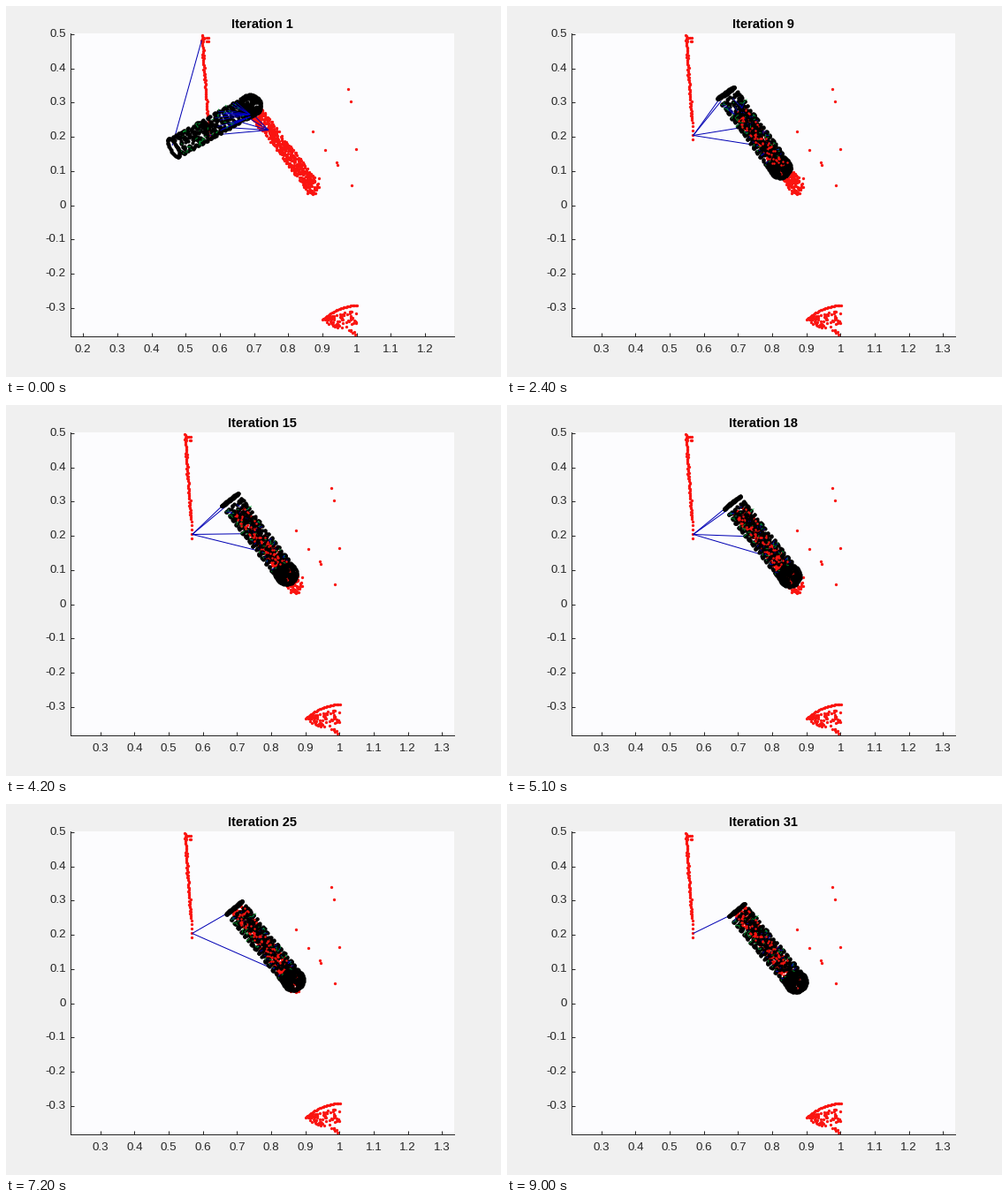
These frames come from a looping animation (560 by 420 pixels, 9.3 s). A matplotlib script:

```python
import numpy as np
import matplotlib.pyplot as plt
from matplotlib.animation import FuncAnimation
from matplotlib.collections import LineCollection

W, H, DPI = 560, 420, 100
PX = 72 / DPI
STEPS = 31
R = 11.6
SCALE = 387.5
RED = "#fa1410"
INK = "#262626"
ROOT = (211, 146)
rng = np.random.default_rng(4)

plt.rcParams["font.family"] = "Liberation Sans"

# Key poses of the model cylinder: step, centre x, centre y, angle
KEYS = np.array([
    [0, 214, 136, -29],
    [4, 262, 127.5, 24.5],
    [8, 278.5, 140, 54],
    [17, 287.5, 151.5, 52],
    [30, 293.5, 160, 50.5],
])


def pchip(t, x, y):
    """Monotone cubic interpolation."""
    h, d = np.diff(x), np.diff(y) / np.diff(x)
    m = np.r_[d[0], np.zeros(len(x) - 2), 0]
    for i in range(1, len(d)):
        if d[i - 1] * d[i] > 0:
            m[i] = 2 / (1 / d[i - 1] + 1 / d[i])
    i = min(np.searchsorted(x, t, side="right") - 1, len(h) - 1)
    s = (t - x[i]) / h[i]
    return (y[i] + h[i] * m[i] * s * (1 - s) ** 2
            + (y[i + 1] - y[i]) * s * s * (3 - 2 * s)
            + h[i] * m[i + 1] * s * s * (s - 1))


def disc(n, x, y, r):
    a, d = rng.uniform(0, 2 * np.pi, n), r * np.sqrt(rng.random(n))
    return np.c_[x + d * np.cos(a), y + d * np.sin(a)]


def pole_points():
    y = np.r_[np.linspace(32, 128, 62), np.linspace(131, 150, 5)]
    x = 203 + 8 * ((y - 32) / 118) ** 1.15 + rng.normal(0, .5, y.size)
    return np.c_[x, y]


def tube_points():
    s, n = rng.uniform(0, 106, (520, 1)), rng.uniform(-8, 8, (520, 1))
    strip = np.array([262, 118]) + s * (.61, .79) + n * (.79, -.61)
    return np.r_[strip, disc(50, 327, 204, 9)]


def fan_points():
    def rim(x):
        return 338.5 + 16 * ((378 - x) / 39) ** 2

    x = np.linspace(339, 378, 30)
    arc = np.c_[x, rim(x)]
    x = rng.uniform(342, 378, 85)
    low = 357 + .42 * (x - 340)
    return np.r_[arc, np.c_[x, rim(x) + (low - rim(x)) * rng.uniform(.2, 1, x.size)]]


def model_points():
    """Cylinder surface: along axis (0..1), end tilt, across, extra along in px."""
    rim = np.linspace(0, 2 * np.pi, 44)
    s = np.repeat(np.linspace(.08, .95, 16), 29)
    phi = rng.uniform(0, 2 * np.pi, s.size)
    s = s + rng.normal(0, .007, s.size)
    cap = disc(130, 0, 0, R + .6)
    edge = np.c_[np.cos(rim), np.sin(rim)] * (R + .6)
    cap = np.r_[cap, edge]
    along = np.r_[0 * rim, s, np.ones(len(cap))]
    tilt = np.r_[np.cos(rim), np.cos(phi), np.zeros(len(cap))]
    across = np.r_[R * np.sin(rim), R * np.sin(phi), cap[:, 1]]
    extra = np.r_[np.zeros(rim.size + s.size), cap[:, 0]]
    return along, tilt, across, extra


pole, tube, fan = pole_points(), tube_points(), fan_points()
tip = disc(8, 208, 39, 5)
stray = [(368, 93), (371, 107), (328, 141), (342, 162), (377, 161),
         (355.5, 176), (356, 179), (372, 202), (335, 194)]
along, tilt, across, extra = model_points()
front = tube[(rng.random(len(tube)) < .13) & (tube[:, 1] < 180)]
body = np.arange(44, 480)
pairs = rng.choice(body, 45, replace=False)
flecks = rng.choice(body, 45, replace=False)
fleck_dir = rng.normal(0, 2, (45, 2))


def pose(k):
    cx, cy, ang = (pchip(k, KEYS[:, 0], KEYS[:, j]) for j in (1, 2, 3))
    early = np.exp(-(k / 6) ** 2)
    size, lean = 105 - 6 * early, 1 + 3 * early
    a = np.radians(ang)
    u = np.array([np.cos(a), np.sin(a)])
    return np.array([cx, cy]) - u * size / 2, u, np.array([u[1], -u[0]]), size, lean


def place(k):
    start, u, n, size, lean = pose(k)
    return (start + (along * size + tilt * lean + extra)[:, None] * u
            + across[:, None] * n)


def long_lines(k):
    """Wrong matches between the pole and the cylinder, dropping out over time."""
    start, u, n, size, _ = pose(k)
    if k == 0:
        hub = (278, 140)
        return ([[pole[4], start + 3 * n], [ROOT, hub]]
                + [[start + s * size * u, hub] for s in (.5, .7, .85, .95)])
    slide = .25 * np.exp(-(k / 6) ** 4)
    marks = [(0, STEPS), (.03, 21), (.39, 21), (.62 + .02 * max(k - 16, 0), 28)]
    return [[ROOT, start + (s + slide) * size * u - (R - 2) * n]
            for s, last in marks if k < last]


def short_lines(pts):
    out = []
    for p in pts[pairs]:
        d = np.hypot(*(tube - p).T)
        if d.min() < 40:
            out.append([p, tube[d.argmin()]])
    return out


fig = plt.figure(figsize=(W / DPI, H / DPI), dpi=DPI, facecolor="#f0f0f0")
ax = fig.add_axes([72.7 / W, 1 - 373.5 / H, 434 / W, 342.5 / H], facecolor="#fcfcfe")
ax.set_ylim(373, 30.5)
for side in ("top", "right"):
    ax.spines[side].set_visible(False)
for side in ("left", "bottom"):
    ax.spines[side].set(linewidth=PX, color=INK)
xv, yv = np.arange(1, 15) / 10, np.arange(-3, 6) / 10
ax.set_xticks(107 + (xv - .3) * SCALE * .998, [f"{v:g}" for v in xv])
ax.set_yticks(225 - yv * SCALE, [f"{v:g}" for v in yv], va="center")
ax.tick_params(direction="in", length=4 * PX, width=PX, color=INK,
               labelcolor=INK, labelsize=13.33 * PX)
ax.tick_params(axis="x", pad=9 * PX)
ax.tick_params(axis="y", pad=5 * PX)
title = fig.text(290 / W, 1 - 25 / H, "", ha="center", va="baseline",
                 weight="bold", size=14.67 * PX)


def dots(pts, color, size, z):
    return ax.plot(*np.asarray(pts).T, "o", color=color, ms=size * PX, mew=0, zorder=z)[0]


def strokes(color, width, z):
    lines = LineCollection([], colors=color, linewidths=width * PX, zorder=z)
    return ax.add_collection(lines, autolim=False)


dots(np.vstack([pole, tip, fan, stray, tube]), RED, 3.3, 3)
far = strokes("#0000b4", 1, 4)
model = dots([(0, 0)], "black", 4.2, 5)
near = strokes("#0000c8", .7, 6)
green = strokes("#00a030", .8, 6)
inner = dots(front, RED, 2.5, 7)


def draw(k):
    pts = place(k)
    # Tight horizontal limits follow the leftmost point
    shift = max(0, (202.5 - pts[:, 0].min()) / 2)
    ax.set_xlim(73 - shift, 507 - shift)
    model.set_data(*pts.T)
    inner.set_visible(k > 2)
    near.set_segments(short_lines(pts))
    far.set_segments(long_lines(k))
    green.set_segments([[p, p + d] for p, d in zip(pts[flecks], fleck_dir)])
    title.set_text(f"Iteration {k + 1}")
    return []


anim = FuncAnimation(fig, draw, frames=STEPS, interval=300, repeat=True,
                     repeat_delay=0, blit=False)
plt.show()
```
